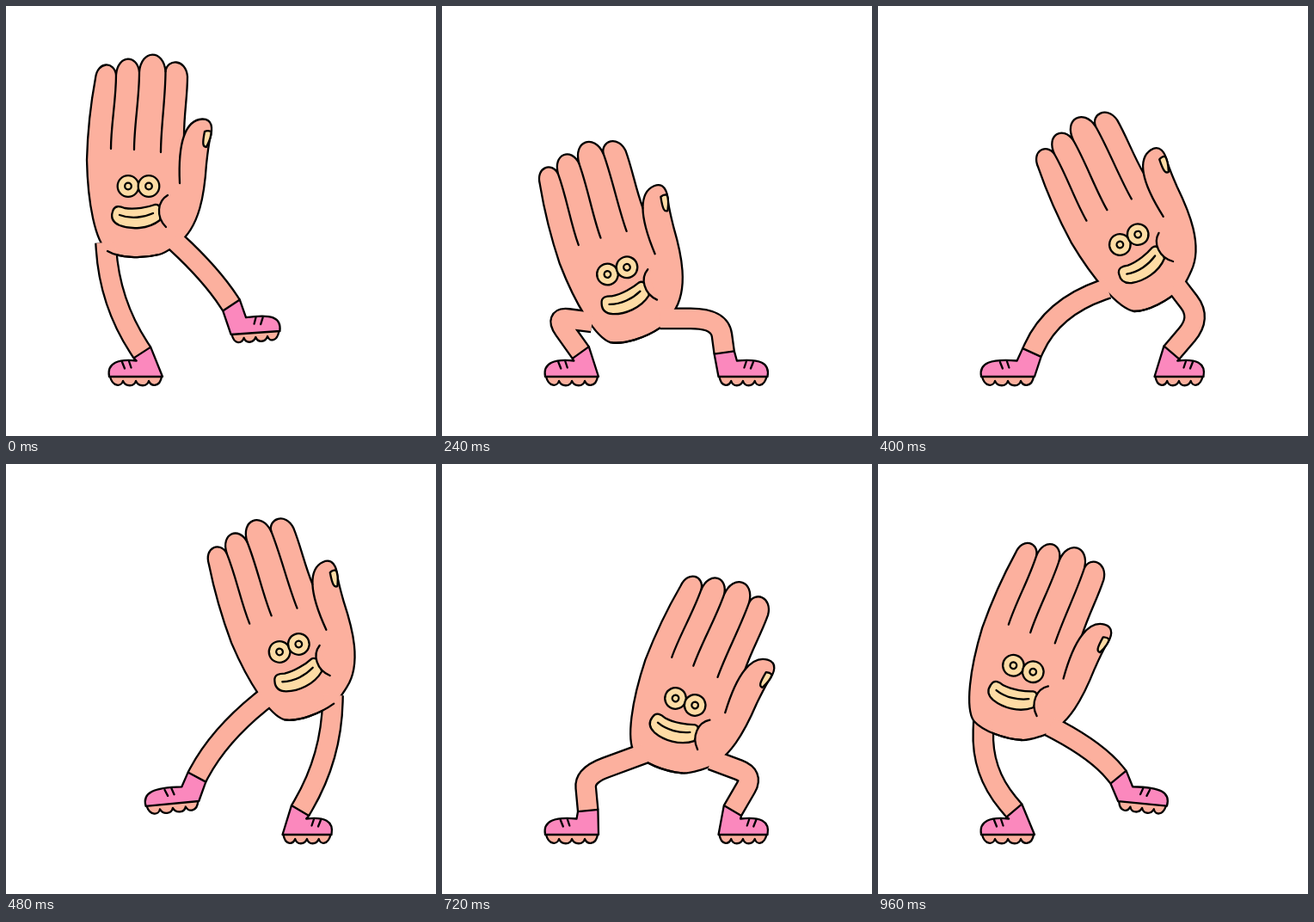
Recreate the animation shown at these times as an HTML page with a canvas. Size 500 by 500 pixels, loop 1040 ms.

```html
<!DOCTYPE html>
<html lang="en">
<head>
<meta charset="utf-8">
<title>Side-stepping hand</title>
<style>
html, body { margin: 0; width: 100%; height: 100%; overflow: hidden; background: #fff; }
canvas { display: block; width: 500px; height: 500px; }
</style>
</head>
<body>
<canvas id="stage" width="500" height="500"></canvas>
<script>
const ctx = document.getElementById('stage').getContext('2d');
const SKIN = '#fcb09e', PINK = '#fb88bd', CREAM = '#fedca5', INK = '#000';
const STEP = 80, COUNT = 13;
const LINE = 2.3, LEG = 23.5, GROUND = 431;

// Key poses of the palm: step, x, y, tilt in degrees.
const poses = [
  [0, 154, 209, 0], [2, 168.5, 276.5, -7], [4, 247, 317, -31], [6, 329, 213.5, -22],
  [7, 325, 199, -4], [9, 283, 276, 19.5], [11, 212.5, 302.5, 37.5], [12, 169, 237.5, 18]
];

const rad = deg => deg * Math.PI / 180;
const clamp = v => Math.max(0, Math.min(1, v));
const mix = (a, b, k) => a + (b - a) * k;
const mixPoint = (a, b, k) => [mix(a[0], b[0], k), mix(a[1], b[1], k)];

function keyAt(i) {
  const n = poses.length, turn = Math.floor(i / n);
  const [step, ...values] = poses[i - turn * n];
  return [step + turn * COUNT, ...values];
}

// Smooth periodic curve through the key poses.
function palmAt(step) {
  const i = poses.findLastIndex(p => p[0] <= step);
  const [p, a, b, n] = [i - 1, i, i + 1, i + 2].map(keyAt);
  const h = b[0] - a[0], u = (step - a[0]) / h;
  const ease = u * u * (3 - 2 * u);
  return [1, 2, 3].map(k => {
    const from = (b[k] - p[k]) / (b[0] - p[0]);
    const to = (n[k] - a[k]) / (n[0] - a[0]);
    return mix(a[k], b[k], ease) + h * u * (1 - u) * ((1 - u) * from - u * to);
  });
}

// Kick height from 0 to 1: two steps up, then `fall` steps down.
function kick(step, peak, fall) {
  const d = (step - peak + COUNT * 1.5) % COUNT - COUNT / 2;
  return d < 0
    ? Math.cos(Math.PI / 2 * clamp(-d / 2))
    : Math.cos(Math.PI / 2 * clamp(d / fall)) ** 2;
}

// `side` is -1 for the left leg and 1 for the right one; toes point outward.
function makeLeg(side, hip, base, lift) {
  const foot = [base - side * 60 * lift, GROUND - 51 * lift];
  const reach = side * (foot[0] - hip[0]);
  const crouch = clamp((hip[1] - 290) / 45) * clamp((115 - reach) / 25);

  const end = [foot[0] - side * 8, foot[1] - 28];
  const dx = end[0] - hip[0], dy = end[1] - hip[1];
  const bow = side * 18 * (1 - lift) / Math.hypot(dx, dy);
  const mid = mixPoint(hip, end, 0.5);
  const straight = [mid[0] + dy * bow, mid[1] - dx * bow];
  const bent = [foot[0] + side * (32 - 0.55 * reach), GROUND - 69];
  const knee = mixPoint(straight, bent, crouch);

  const lean = side * (knee[0] - foot[0]);
  const ankle = [foot[0] + side * (lean / 4 - 15), foot[1] - 28 - 4 * lift];
  const tilt = side * lift * (36 - 40 * lift);
  return { side, hip, foot, knee, ankle, crouch, tilt };
}

function curve(p) {
  ctx.moveTo(p[0], p[1]);
  for (let i = 2; i < p.length; i += 6) ctx.bezierCurveTo(...p.slice(i, i + 6));
}

function line(...p) {
  ctx.beginPath();
  curve(p);
  ctx.stroke();
}

function segment(x1, y1, x2, y2) {
  ctx.beginPath();
  ctx.moveTo(x1, y1);
  ctx.lineTo(x2, y2);
  ctx.stroke();
}

function paint(color) {
  ctx.fillStyle = color;
  ctx.fill();
  ctx.stroke();
}

function inFrame(x, y, tilt, draw) {
  ctx.save();
  ctx.translate(x, y);
  ctx.rotate(rad(tilt));
  draw();
  ctx.restore();
}

// Hand coordinates are those of the upright pose.
function inHand(palm, draw) {
  inFrame(...palm, () => {
    ctx.translate(-poses[0][1], -poses[0][2]);
    draw();
  });
}

function tube(leg, color, width) {
  const soft = 0.9 - 0.55 * leg.crouch;
  ctx.save();
  ctx.strokeStyle = color;
  ctx.lineWidth = width;
  ctx.lineCap = 'butt';
  ctx.beginPath();
  ctx.moveTo(...leg.hip);
  ctx.lineTo(...mixPoint(leg.knee, leg.hip, soft));
  ctx.quadraticCurveTo(...leg.knee, ...mixPoint(leg.knee, leg.ankle, soft));
  ctx.lineTo(...leg.ankle);
  ctx.stroke();
  ctx.restore();
}

const legInk = leg => tube(leg, INK, LEG + LINE);
const legSkin = leg => tube(leg, SKIN, LEG - LINE);

const roots = [[104, 84], [128, 80], [155, 77], [185.5, 76], [211, 82]];
const tips = [64, 56, 50, 61];
const creases = [[122, 166], [149, 167], [180, 170]];
const heel = [178, 289, 158, 294, 132, 293, 118, 285];

function handShape() {
  ctx.beginPath();
  ctx.moveTo(94, 179);
  ctx.bezierCurveTo(95, 140, 101, 100, ...roots[0]);
  tips.forEach((y, i) => {
    const end = roots[i + 1];
    ctx.bezierCurveTo(roots[i][0] + 2, y, end[0] - 2, y, ...end);
  });
  ctx.bezierCurveTo(211, 105, 207, 125, 207, 151);
  ctx.bezierCurveTo(211, 140, 218, 132, 228, 131.5);
  ctx.bezierCurveTo(240, 131, 241, 142, 237, 155);
  ctx.bezierCurveTo(235, 165, 234, 175, 233, 184);
  ctx.bezierCurveTo(231, 215, 226, 258, 199, 277);
  ctx.bezierCurveTo(192, 282, 186, 287, heel[0], heel[1]);
  ctx.bezierCurveTo(...heel.slice(2));
  ctx.bezierCurveTo(104, 274, 95, 230, 94, 179);
  paint(SKIN);
}

function eye(x, y) {
  ctx.beginPath();
  ctx.arc(x, y, 12.3, 0, 7);
  paint(CREAM);
  ctx.beginPath();
  ctx.arc(x, y, 3.8, 0, 7);
  ctx.stroke();
}

function details() {
  creases.forEach(([x, y], i) => {
    const [rx, ry] = roots[i + 1];
    line(rx, ry, rx, ry + 30, x, y - 28, x, y);
  });
  line(207, 151, 202, 165, 201, 185, 202, 206);

  ctx.beginPath();
  curve([231, 146, 233, 145, 236, 145, 238.5, 146, 239, 153, 235, 160, 233, 164,
    229, 164, 228, 161, 231, 146]);
  paint(CREAM);

  eye(142, 209.5);
  eye(166, 209.5);

  ctx.beginPath();
  curve([124, 239, 126, 231, 133, 233, 138, 235, 150, 237, 165, 234, 173, 231,
    180, 230, 181, 238, 179, 249, 165, 260, 145, 260, 132, 255,
    123, 251, 122, 245, 124, 239]);
  paint(CREAM);
  line(132, 243, 145, 248, 160, 246, 171, 241);

  ctx.beginPath();
  curve([188, 220, 176, 227, 174, 245, 186, 257]);
  paint(SKIN);
}

function shoe({ side, foot, knee, ankle, tilt }) {
  const length = Math.hypot(ankle[0] - knee[0], ankle[1] - knee[1]);
  const nx = side * (ankle[1] - knee[1]) / length * LEG / 2;
  const ny = -side * (ankle[0] - knee[0]) / length * LEG / 2;
  const c = Math.cos(rad(tilt)), s = Math.sin(rad(tilt));
  const local = k => {
    const dx = ankle[0] + k * nx - foot[0], dy = ankle[1] + k * ny - foot[1];
    return [side * (dx * c + dy * s), dy * c - dx * s];
  };
  const front = local(1), back = local(-1);
  const instep = front[0] / 2 - 2;
  const shift = Math.min(0, (instep + 2) * 0.8);
  const half = side < 0 ? 31 : 28.5;

  inFrame(...foot, tilt, () => {
    ctx.scale(side, 1);

    const bump = (half * 2 - 2) / 4;
    ctx.beginPath();
    ctx.moveTo(1 - half, 0);
    for (let i = 0; i < 4; i++) {
      const x = 1 - half + i * bump;
      ctx.bezierCurveTo(x + 2, 12, x + bump - 3, 12, x + bump, i < 3 ? 5 : 0);
    }
    paint(SKIN);

    ctx.beginPath();
    ctx.moveTo(...back);
    ctx.lineTo(...front);
    ctx.lineTo(instep, -18.5);
    ctx.bezierCurveTo(20, -21, half + 3, -16, half, 0);
    ctx.lineTo(-half, 0);
    ctx.closePath();
    paint(PINK);

    segment(16 + shift, -17, 13 + shift, -9.5);
    segment(8 + shift, -18, 5.5 + shift, -10.5);
  });
}

function draw(step) {
  const palm = palmAt(step);
  const [x, y, tilt] = palm;
  const legs = [
    makeLeg(-1, [x - 38 - 0.45 * tilt, y + 66 - 0.3 * Math.abs(tilt)], 151, kick(step, 7, 2)),
    makeLeg(1, [x + 40 - 0.5 * tilt, y + 62 + 0.3 * tilt], 350, kick(step, 0, 3))
  ];

  ctx.fillStyle = '#fff';
  ctx.fillRect(0, 0, 500, 500);
  ctx.strokeStyle = INK;
  ctx.lineWidth = LINE;
  ctx.lineCap = ctx.lineJoin = 'round';

  legs.forEach(legInk);
  inHand(palm, handShape);
  // Extended legs tuck behind the palm crease, bent thighs cover it.
  legs.filter(leg => leg.crouch < 0.5).forEach(legSkin);
  inHand(palm, () => line(...heel));
  legs.filter(leg => leg.crouch >= 0.5).forEach(legSkin);
  inHand(palm, details);
  legs.forEach(shoe);
}

const start = performance.now();
function tick() {
  draw(Math.floor((performance.now() - start) / STEP) % COUNT);
  requestAnimationFrame(tick);
}
tick();
</script>
</body>
</html>
```
